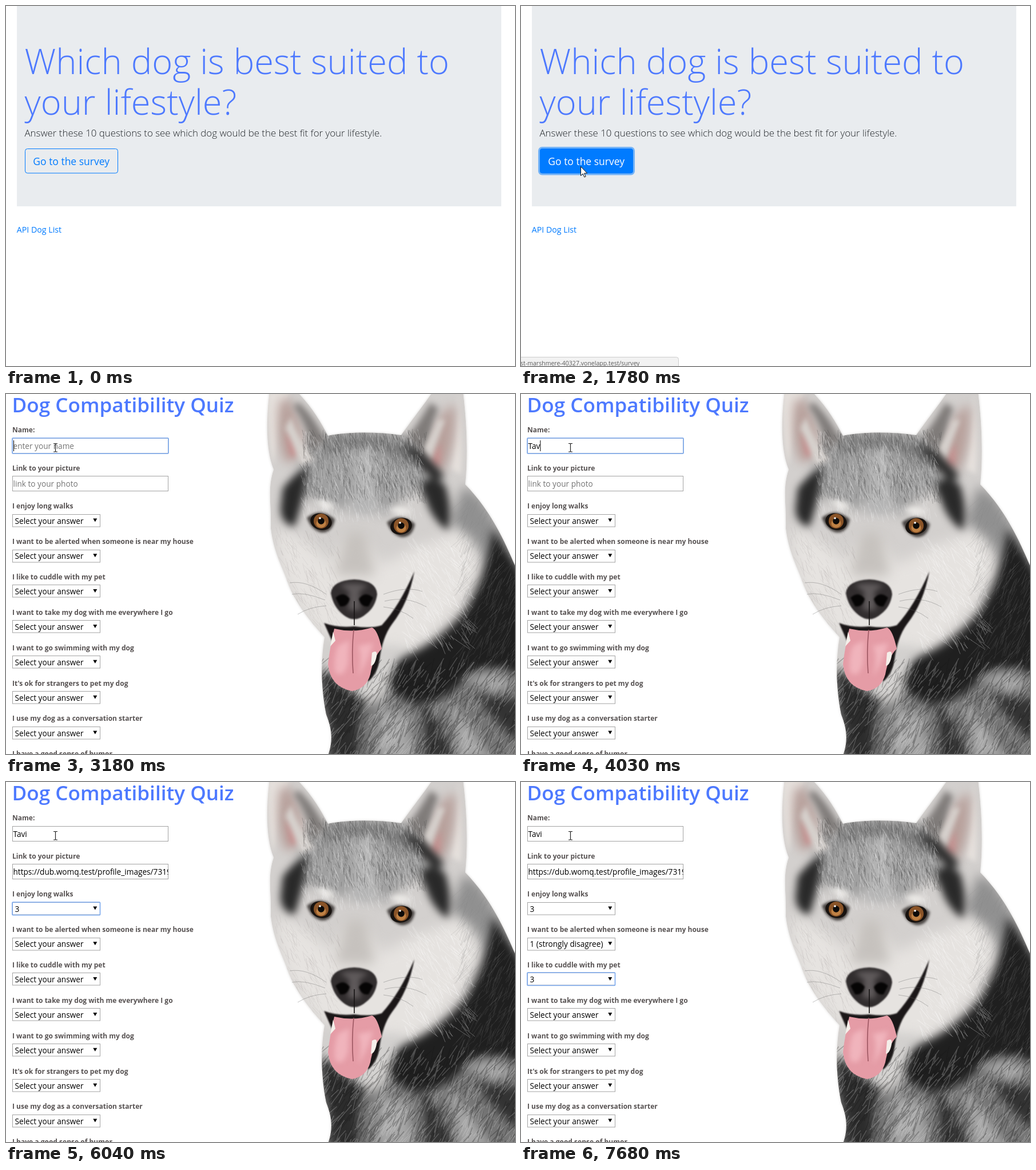
These frames come from a looping animation (890x629 px, 8000 ms). An HTML page with a canvas:

```html
<!DOCTYPE html>
<html lang="en">
<head>
<meta charset="utf-8">
<title>Dog quiz</title>
<style>
  html, body { margin: 0; width: 100%; height: 100%; overflow: hidden; background: #fff; }
  canvas, svg { position: absolute; left: 0; top: 0; width: 890px; height: 629px; }
  svg { font-family: "Open Sans", sans-serif; font-size: 13.65px; }
  .display { font-size: 61.4px; font-weight: 300; fill: #4d79ff; }
  .lead { font-size: 16.87px; font-weight: 300; fill: #212529; }
  .btn { font-size: 17.5px; }
  .title { font-size: 35.1px; font-weight: 600; fill: #4d79ff; }
  .label { font-size: 12.03px; font-weight: 700; fill: #575252; }
  .hint { fill: #757575; }
  .box { fill: #fff; stroke: #a3a3a3; }
  .ring { fill: none; stroke: #78a7ee; stroke-width: 1.6; }
  .url { font-size: 10.6px; font-weight: 700; }
  .status { font-size: 10.55px; fill: #5c5c5c; }
</style>
</head>
<body>
<canvas id="dog" width="890" height="629"></canvas>
<svg id="stage" viewBox="0 0 890 629"></svg>
<script>
const LOOP = 8000;
const LINK = 'https://dub.womq.test/profile_images/731964218850372645/kfd73Rmo_400x400.jpg';
const QUESTIONS = [
  'I enjoy long walks',
  'I want to be alerted when someone is near my house',
  'I like to cuddle with my pet',
  'I want to take my dog with me everywhere I go',
  'I want to go swimming with my dog',
  "It's ok for strangers to pet my dog",
  'I use my dog as a conversation starter',
  'I have a good sense of humor'
];
const ROW = 61.85;
const $ = id => document.getElementById(id);

// ---------- page markup ----------
const text = (x, y, cls, str, more = '') => `<text x="${x}" y="${y}" class="${cls}" ${more}>${str}</text>`;
const rect = (x, y, w, h, more = '') => `<rect x="${x}" y="${y}" width="${w}" height="${h}" ${more}/>`;
const wave = (from, to) =>
  `<path d="M${from} 165q1 -2.4 2 0${'t2 0'.repeat((to - from) / 2 - 1)}" fill="none" stroke="#e22" stroke-width=".9"/>`;

const select = (label, i) => {
  const y = i * ROW;
  return text(11, 200.3 + y, 'label', label) +
    rect(11.5, Math.round(209.7 + y) + .5, 153, 21.5, `id="box${i}" class="box"`) +
    text(15.5, 226.6 + y, '', 'Select your answer', `id="pick${i}"`) +
    `<path d="M152.3 ${217.4 + y}h7l-3.5 6z"/>`;
};

$('stage').innerHTML = `
<defs><clipPath id="field">${rect(12, 144, 271.5, 26)}</clipPath></defs>
<g id="home">
  ${rect(0, 0, 890, 629, 'fill="#fff"')}
  ${rect(19, 0, 847, 350, 'fill="#e9ecef"')}
  ${text(32.5, 119, 'display', 'Which dog is best suited to')}
  ${text(32.5, 190, 'display', 'your lifestyle?')}
  ${text(32.5, 227.5, 'lead', 'Answer these 10 questions to see which dog would be the best fit for your lifestyle.')}
  ${rect(33.5, 249.5, 162, 42.5, 'rx="4" fill="none" stroke="#007bff"')}
  ${text(47.3, 277.6, 'btn', 'Go to the survey', 'fill="#007bff"')}
  ${rect(31.5, 247.5, 166, 46.5, 'id="glow" rx="5.5" fill="none" stroke="#74b3f7" stroke-width="3"')}
  <g id="hot">
    ${rect(33, 249, 163, 43.5, 'rx="4" fill="#007bff"')}
    ${text(47.3, 277.6, 'btn', 'Go to the survey', 'fill="#fff"')}
  </g>
  ${text(18.8, 396, '', 'API Dog List', 'fill="#007bff" style="font-size:14.2px"')}
</g>
<g id="quiz">
  ${text(10.5, 32, 'title', 'Dog Compatibility Quiz')}
  ${text(11, 67.2, 'label', 'Name:')}
  ${rect(11.5, 77.5, 272, 26, 'class="box"')}
  ${text(12.5, 95.6, '', '', 'id="name"')}
  ${text(11, 133.6, 'label', 'Link to your picture')}
  ${rect(11.5, 143.5, 272, 26, 'class="box"')}
  <g clip-path="url(#field)">${text(12.5, 162, '', '', 'id="link"')}</g>
  <g id="typos">${wave(139, 255)}${wave(259, 281)}</g>
  ${QUESTIONS.map(select).join('')}
  ${rect(11, 0, 153.5, 22.5, 'id="ring" class="ring" rx="1"')}
  ${rect(0, 0, 1, 19, 'id="caret"')}
  ${rect(11.5, 104.5, 274, 45, 'id="names" fill="#fff" stroke="#c4c4c4"')}
  <g id="tip">
    ${rect(11.5, 170.5, 452, 22.5, 'fill="#fff" stroke="#c9c9c9"')}
    ${text(19, 186, 'url', LINK)}
  </g>
</g>
<g id="status">
  ${rect(-6, 613.5, 281.5, 24, 'rx="4" fill="#f2f2f2" stroke="#cdcdcd"')}
  ${text(-1, 628, 'status', 'st-marshmere-40327.vonelapp.test/survey')}
</g>
<path id="arrow" d="M.5 .5v16l3.7-3.5 2.6 6 2.4-1-2.6-5.8h5.1z" fill="#fff" stroke="#111"/>
<path id="beam" d="M-3.5 -7h2.7l.8 .8 .8-.8h2.7M0 -6.2v12.9M-3.5 7.5h2.7l.8-.8 .8 .8h2.7" fill="none" stroke="#222" stroke-width="1.2"/>`;

// ---------- dog portrait ----------
function paintDog() {
  const g = $('dog').getContext('2d');
  const body = 'M461-5C454 50 455 100 468 132C457 165 464 190 463 235C468 275 482 300 490 322C503 362 530 395 557 425C549 470 552 520 560 560C570 585 572 605 564 629V640H900V322C878 275 858 215 803 158C808 110 806 50 799-5H747C722 30 706 50 691 72C650 66 600 66 563 73C550 48 535 22 508-5Z';
  let seed = 7;
  const rnd = () => (seed = seed * 16807 % 2147483647) / 2147483647;
  const fill = (color, blur, d) => {
    g.filter = blur ? `blur(${blur}px)` : 'none';
    g.fillStyle = color;
    g.fill(new Path2D(d));
    g.filter = 'none';
  };
  const line = (color, width, d) => {
    g.strokeStyle = color;
    g.lineWidth = width;
    g.stroke(new Path2D(d));
  };
  const oval = (color, x, y, rx, ry = rx, turn = 0) => {
    g.fillStyle = color;
    g.beginPath();
    g.ellipse(x, y, rx, ry, turn, 0, 7);
    g.fill();
  };
  const fur = (n, x, y, w, h, angle, len, color, width = 1) => {
    let d = '';
    while (n--) {
      const a = angle + (rnd() - .5) * .7, l = len * (.5 + rnd());
      d += `M${x + rnd() * w} ${y + rnd() * h}l${Math.cos(a) * l} ${Math.sin(a) * l}`;
    }
    line(color, width, d);
  };

  fill('#d8d6d4', 2, body);
  g.save();
  g.clip(new Path2D(body));
  fill('#d3d0ce', 0, body);
  // head
  fill('#a0a0a0', 10, 'M520 85Q625 50 730 85L750 165Q700 160 664 215L626 175L590 205Q540 180 505 175Z');
  fill('#7d7d7d', 9, 'M565 72Q640 62 700 80L735 120Q690 125 660 100L600 95L550 110Z');
  fill('#b4b4b4', 8, 'M612 95H642L650 210H602Z');
  fill('#e6e3e0', 12, 'M470 235Q535 250 565 300Q610 205 655 300L720 265Q770 255 800 225Q835 250 822 310Q785 400 690 460L560 425Q500 375 478 300Z');
  fill('#eceae7', 5, 'M540 188Q560 180 575 198L560 204ZM668 203Q690 190 712 207L690 212Z');
  fill('#c6c2be', 10, 'M592 250Q610 225 632 250L645 318H575Z');
  // neck and chest
  fill('#909090', 10, 'M800 160L830 180Q870 240 905 320L850 330Q830 250 775 225Z');
  fill('#757575', 10, 'M545 490Q620 500 690 460L900 440V650H550Z');
  fill('#d2d0ce', 10, 'M560 425Q640 440 700 440L680 500L655 540L610 540L570 490Z');
  fill('#1f1f1f', 8, 'M850 235Q880 280 910 330V500Q850 455 800 500Q740 560 690 530Q655 510 690 465Q770 425 808 370Q846 300 850 235Z');
  fill('#2c2c2c', 8, 'M553 475Q590 515 628 535Q612 570 615 640H565Q575 590 555 540Z');
  fill('#333', 8, 'M715 530Q760 560 780 640H730Q740 580 715 530ZM820 520Q870 535 905 530V610Q860 590 820 520Z');
  fill('#a8a8a8', 9, 'M770 530Q810 575 850 640H795ZM650 545L705 560L710 640H650ZM800 500Q850 470 890 510L850 520Z');
  // ears
  fill('#e6e1dd', 4, 'M458-5Q455 70 468 125L480 40L496-5ZM790-5Q800 70 795 140L778 130L790 30Z');
  fill('#b8a19c', 9, 'M478 15Q470 75 488 120Q515 120 520 75Q510 30 492 5ZM742 128Q730 90 756 45Q780 10 785 25Q788 90 765 135Z');
  fill('#c88f8f', 6, 'M490 65Q505 80 512 105L498 110ZM745 125Q745 105 760 85L758 125Z');
  fill('#7f7b79', 6, 'M512 15Q540 40 558 80L535 105Q530 60 502 20ZM703 75Q725 45 742 15L756 25Q738 70 735 118Z');
  fill('#d6d1cd', 4, 'M498 40Q512 80 540 115L515 125Q500 80 488 60ZM768 45Q752 85 742 115L730 95Q745 70 755 45Z');
  fill('#292929', 7, 'M484 165Q505 138 528 128Q520 190 504 232Q480 226 480 200ZM724 160Q745 135 768 160Q782 205 772 238Q747 222 736 190ZM690 85Q735 100 768 145L748 150Q720 125 690 85Z');
  // hair
  fur(500, 520, 72, 215, 120, -1.8, 13, 'rgba(45,45,45,.25)');
  fur(500, 520, 75, 210, 150, -1.8, 13, 'rgba(240,240,240,.28)');
  fur(250, 470, 230, 110, 170, 1.1, 16, 'rgba(150,145,140,.14)');
  fur(250, 690, 250, 120, 190, .9, 20, 'rgba(255,255,255,.3)');
  fur(400, 800, 180, 100, 320, 2.1, 24, 'rgba(130,130,130,.2)');
  fur(500, 550, 460, 350, 180, 2.1, 28, 'rgba(20,20,20,.3)', 1.4);
  fur(400, 550, 460, 350, 180, 2.1, 26, 'rgba(225,225,225,.25)', 1.3);
  g.restore();

  // eyes
  [[551, 223, .25], [691, 231, -.2]].forEach(([x, y, turn]) => {
    fill('rgba(40,36,33,.8)', 2, `M${x - 25} ${y - 7}Q${x} ${y - 26} ${x + 24} ${y - 4}Q${x + 20} ${y + 20} ${x} ${y + 19}Q${x - 18} ${y + 14} ${x - 25} ${y - 7}Z`);
    oval('#17120f', x, y, 19, 14.5, turn);
    oval('#8a5428', x, y - 1, 13);
    oval('#bf8144', x, y + 3, 8.5, 7.5);
    oval('#0c0a09', x, y - 1, 5.8);
    oval('#fff', x - 2, y - 6, 1.8);
  });

  // mouth, tongue and nose
  fill('#1b1718', 1, 'M556 400Q580 409 609 406Q640 410 657 404Q688 370 714 310Q704 365 675 402Q658 425 653 465Q648 490 634 502L572 436Z');
  fill('#e59ca6', 0, 'M574 410Q566 445 563 472Q567 512 605 519Q630 515 637 490Q642 460 657 445Q650 412 640 408Q608 418 574 410Z');
  fill('#f0b4bc', 4, 'M580 440Q572 465 575 485Q590 500 598 470L600 430ZM615 440Q625 460 615 495Q632 470 642 435Z');
  line('#9c5661', 1.6, 'M608 412Q604 450 607 488');
  fill('#f4efea', 0, 'M640 452Q650 446 648 458Q645 474 638 475ZM572 415L576 431L567 441Z');
  fill('#312d2e', 1, 'M568 348Q570 326 609 324Q648 326 649 350Q646 372 630 384Q610 402 590 386Q572 372 568 348Z');
  fill('#5f5a5b', 5, 'M583 334Q608 327 634 335L618 345L620 378H598L600 345Z');
  fill('#060505', 1.5, 'M576 356Q590 343 601 358Q597 373 584 371ZM642 356Q628 343 617 358Q621 373 634 371Z');
  line('#161313', 1.6, 'M609 362V404');
  line('rgba(90,90,90,.4)', .9, 'M560 350Q525 325 496 330M558 360Q520 345 500 350M560 370Q530 372 510 385M660 350Q700 335 728 345M662 362Q700 352 735 372M660 372Q690 375 712 392');
}
paintDog();

// ---------- timeline ----------
const NAME = [[0, ''], [3630, 'T'], [3880, 'Ta'], [4030, 'Tav'], [4180, 'Tavi']];
const FOCUS = [[0, ''], [2930, 'name'], [4410, 'link'], [5280, 0], [6370, 1], [7220, 2]];
const PICKS = [[6040, '3'], [6900, '1 (strongly disagree)'], [7680, '3']];
// start, end, from, to
const MOVES = [
  [150, 930, 792, 584, 130, 284],
  [930, 1180, 130, 284, 104, 280],
  [1940, 2010, 104, 280, 108, 285],
  [2010, 2700, 108, 285, 86.5, 93.5]
];
const STEP = 77;

const at = (t, list) => list.filter(k => k[0] <= t).pop()[1];
const within = (t, a, b) => t >= a && t < b;
const show = (id, on) => { $(id).style.display = on ? '' : 'none'; };

function pointer(t) {
  const [a, b, x0, y0, x1, y1] = MOVES.filter(m => m[0] <= t).pop() || MOVES[0];
  const held = t >= b ? b : a + Math.floor((t - a) / STEP) * STEP;
  const p = Math.max(0, (held - a) / (b - a)), e = p * p * (3 - 2 * p);
  return [x0 + (x1 - x0) * e, y0 + (y1 - y0) * e];
}

function render(t) {
  const quiz = t >= 2010;
  const [x, y] = pointer(t);
  const inField = quiz && (within(y, 77, 104) || within(y, 144, 170));
  show('home', !quiz);
  show('quiz', quiz);
  show('dog', quiz);
  show('arrow', t >= 150 && !inField);
  show('beam', inField);
  $(inField ? 'beam' : 'arrow').setAttribute('transform', `translate(${x} ${y})`);
  $('hot').style.opacity = t < 930 ? 0 : t < 1000 ? .6 : 1;
  $('glow').style.opacity = t < 1710 ? 0 : t < 1780 ? .5 : 1;
  show('status', within(t, 1000, 2395));
  $('status').style.opacity = t < 1080 ? .5 : 1;
  if (!quiz) return;

  const name = at(t, NAME), focus = at(t, FOCUS);
  const pasted = t >= 4810, atEnd = within(t, 4810, 5280);
  const nameEl = $('name'), linkEl = $('link');
  nameEl.textContent = name || 'enter your name';
  nameEl.setAttribute('class', name ? '' : 'hint');
  linkEl.textContent = pasted ? LINK : 'link to your photo';
  linkEl.setAttribute('class', pasted ? '' : 'hint');
  linkEl.setAttribute('x', atEnd ? 281 : 12.5);
  linkEl.setAttribute('text-anchor', atEnd ? 'end' : 'start');
  show('typos', atEnd);
  show('tip', atEnd);
  show('names', within(t, 3630, 3710));

  PICKS.forEach(([time, value], i) => {
    $('pick' + i).textContent = t >= time ? value : 'Select your answer';
  });
  for (let i = 0; i < QUESTIONS.length; i++) {
    const top = 210 + i * ROW;
    $('box' + i).style.stroke = within(y, top, top + 22) ? '#6b6b6b' : '';
  }

  const ring = $('ring'), row = typeof focus === 'number';
  show('ring', focus !== '');
  ring.setAttribute('y', row ? Math.round(209.7 + focus * ROW) : focus === 'name' ? 77 : 143);
  ring.setAttribute('width', row ? 153.5 : 273);
  ring.setAttribute('height', row ? 22.5 : 27);

  const caret = $('caret');
  show('caret', within(t, 2930, 3480) || within(t, 3630, 5280));
  caret.setAttribute('x', atEnd ? 281 : focus === 'name' && name ? 12.5 + nameEl.getComputedTextLength() : 13);
  caret.setAttribute('y', focus === 'link' ? 147 : 81);
}

const start = performance.now();
function tick() {
  render((performance.now() - start) % LOOP);
  requestAnimationFrame(tick);
}
tick();
</script>
</body>
</html>
```
